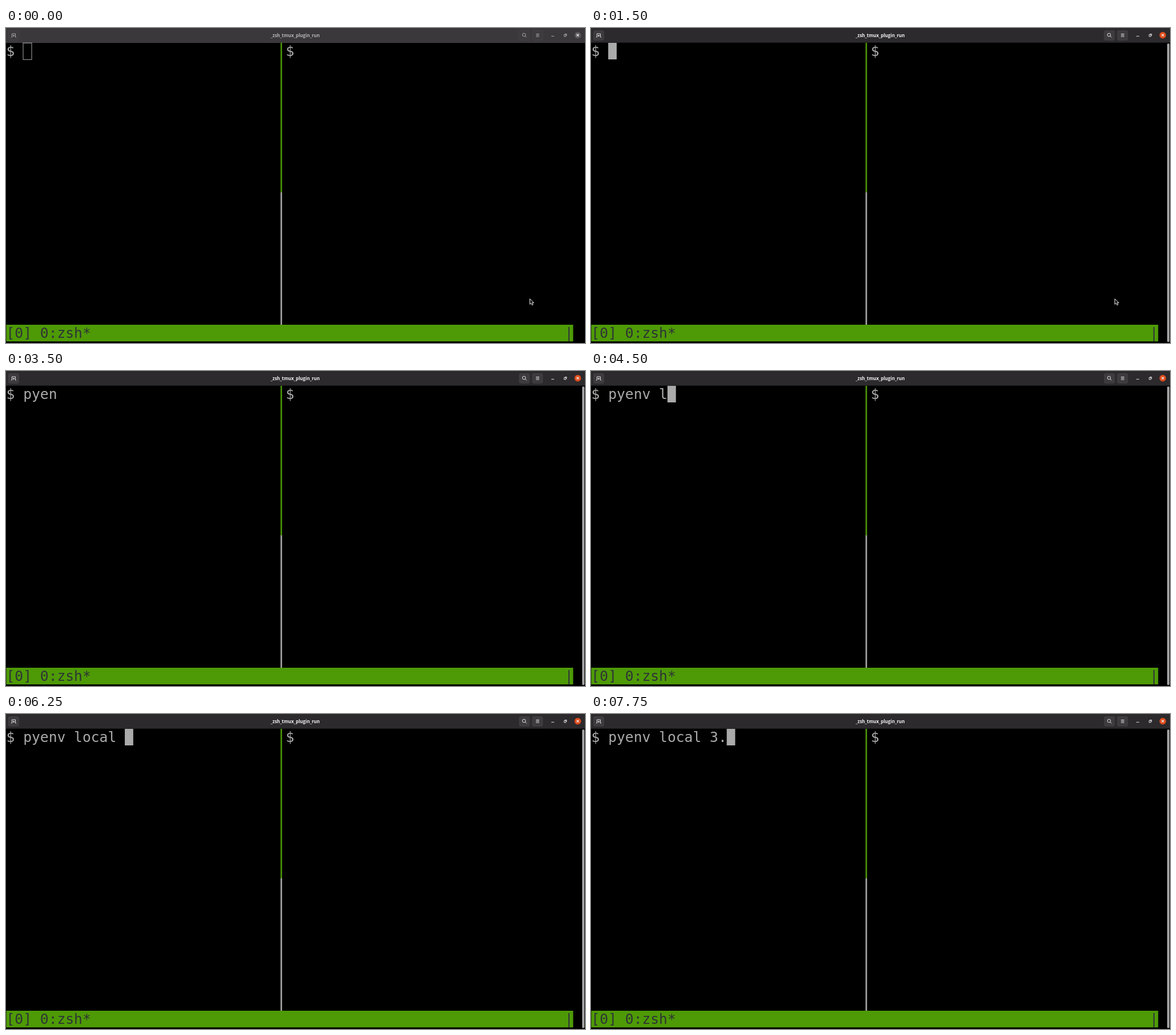
An HTML page for the animation above (8000 ms loop, 1014 by 552 pixels).

```html
<!DOCTYPE html>
<html lang="en">
<head>
<meta charset="utf-8">
<title>_zsh_tmux_plugin_run</title>
<style>
  html, body { margin: 0; width: 100%; height: 100%; overflow: hidden; background: #000; }
  svg { display: block; width: 1014px; height: 552px; }
  .mono { font: 24.63px "DejaVu Sans Mono", monospace; fill: #aaa; white-space: pre; }
  .status { fill: #2e3436; }
  .title { font: 700 7.95px "Open Sans", "Noto Sans", sans-serif; text-anchor: middle; fill: var(--ink); }
  .icon { fill: none; stroke: var(--ink); stroke-width: .9; }
  .btn { fill: var(--btn); stroke: var(--rim); stroke-width: .8; }
  svg { --bar: #2c2a2d; --edge: #1c1b1d; --btn: #3d3b3e; --rim: #454346; --ink: #f2f2f2; --close: #dc4a1b; }
  svg.idle { --bar: #3a383b; --edge: #464447; --btn: #3d3b3e; --rim: #484649; --ink: #b4b3b5; --close: #59575b; }
  .idle #scroll { display: none; }
</style>
</head>
<body>
<svg id="stage" viewBox="0 0 1014 552" class="idle">
  <rect width="1014" height="552" fill="#000"/>

  <!-- header bar -->
  <rect width="1014" height="25" fill="var(--bar)"/>
  <rect y="25" width="1014" height="1" fill="var(--edge)"/>
  <rect class="btn" x="4.4" y="4.4" width="18" height="17" rx="2.5"/>
  <path class="icon" d="M9 16h1.5v-6h6v6H18M13.5 11.7v3.6M11.7 13.5h3.6"/>
  <text class="title" x="506.5" y="15.6">_zsh_tmux_plugin_run</text>
  <rect class="btn" x="898.9" y="4.4" width="18" height="17" rx="2.5"/>
  <path class="icon" d="M909.3 14.1l2.4 2.4M904.4 12a2.8 2.8 0 1 0 5.6 0a2.8 2.8 0 1 0 -5.6 0"/>
  <rect class="btn" x="921.9" y="4.4" width="18" height="17" rx="2.5"/>
  <path class="icon" d="M928.2 10.4h5.6M928.2 12.7h5.6M928.2 15h5.6"/>
  <path class="icon" d="M955 14.4h5M977.4 11.7h3.2v3.2h-3.2zM978.6 10.5h3.2v3.2"/>
  <circle cx="1001.3" cy="12.6" r="5.8" fill="var(--close)"/>
  <path d="M999.2 10.5l4.2 4.2M1003.4 10.5l-4.2 4.2" stroke="#f4f4f4" stroke-width="1.1"/>

  <!-- panes -->
  <rect x="480.8" y="26" width="2.6" height="262" fill="#4e9a06"/>
  <rect x="480.8" y="288" width="2.6" height="232" fill="#aaa"/>
  <text class="mono" id="line" x=".5" y="49"></text>
  <text class="mono" x="489.9" y="49">$</text>
  <g id="cursors" fill="#aaa">
    <rect id="low" y="50" width="14.8" height="5"/>
    <rect id="high" y="26" width="14.8" height="24"/>
    <rect id="hollow" x="30" y="26.3" width="15" height="29" fill="none" stroke="#aaa" stroke-width="1"/>
  </g>

  <!-- status line -->
  <rect x=".5" y="520" width="992.8" height="29.2" fill="#4e9a06"/>
  <text class="mono status" x=".5" y="543">[0] 0:zsh*</text>
  <text class="mono status" x="978.5" y="543">|</text>

  <rect id="scroll" x="1009" y="27" width="4" height="523.5" rx="2" fill="#a3a2a4"/>
  <path id="pointer" d="M917.3 474.6v9.6l2.3-2l1.7 3.5l1.8-.9l-1.7-3.3h3z" fill="#111" stroke="#e8e8e8" stroke-width="1"/>
</svg>
<script>
  const LOOP = 8000, CELL = 14.825;
  const [stage, line, low, high, hollow, pointer] =
    ["stage", "line", "low", "high", "hollow", "pointer"].map(id => document.getElementById(id));

  // start time, typed text, cursor: "hollow", "on", "off" or "torn"
  const steps = [
    [0, "", "hollow"],
    [250, "", "on"],
    [750, "", "off"],
    [1500, "", "on"],
    [2000, "p", "on"],
    [2250, "py", "on"],
    [2750, "pyen", "on"],
    [3000, "pyenb", "on"],
    [3500, "pyen", "off"],
    [3750, "pyenv", "on"],
    [4000, "pyenv ", "torn"],
    [4250, "pyenv ", "on"],
    [4500, "pyenv l", "on"],
    [4750, "pyenv loca", "on"],
    [5000, "pyenv local ", "on"],
    [5750, "pyenv local ", "off"],
    [6250, "pyenv local ", "on"],
    [7000, "pyenv local ", "off"],
    [7250, "pyenv local 3", "on"],
    [7750, "pyenv local 3.", "on"]
  ];

  const show = (el, on) => el.setAttribute("visibility", on ? "visible" : "hidden");
  const place = (el, col) => el.setAttribute("x", (0.5 + col * CELL).toFixed(2));

  function render(t) {
    const [, text, cursor] = steps.findLast(s => s[0] <= t);
    const col = text.length + 2;
    const solid = cursor === "on" || cursor === "torn";
    line.textContent = "$ " + text;
    place(high, col);
    place(low, cursor === "torn" ? col - 1 : col);
    show(high, solid);
    show(low, solid);
    show(hollow, cursor === "hollow");
    show(pointer, t < 2000);
    stage.classList.toggle("idle", t < 250);
  }

  const start = performance.now();
  function tick() {
    render((performance.now() - start) % LOOP);
    requestAnimationFrame(tick);
  }
  tick();
</script>
</body>
</html>
```
